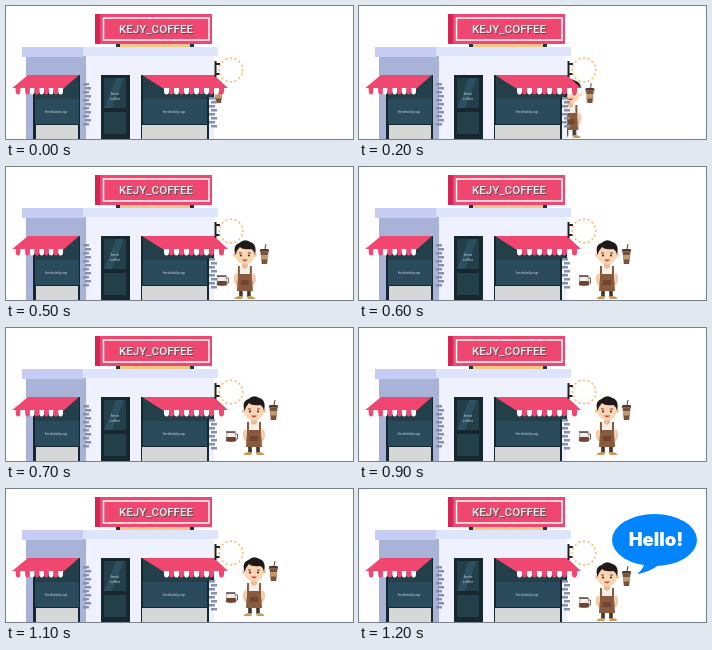
Animation, 347 px wide and 133 px high, one loop 6.2 s. Source, as an HTML page:

```html
<!DOCTYPE html>
<html lang="en">
<head>
<meta charset="utf-8">
<title>Coffee shop greeting</title>
<style>
  html, body { margin: 0; width: 100%; height: 100%; overflow: hidden; background: #fff; }
  svg { display: block; width: 347px; height: 133px; }
  text { text-anchor: middle; }
  .small { font: 3.6px "Open Sans", sans-serif; fill: #dce5ea; }
  .sign { font: 500 11.6px Roboto, sans-serif; }
  .hello { font: 900 18.5px Inter, sans-serif; fill: #fff; }
  .walk { animation: walk 6.2s steps(6, end) infinite; }
  .hop { animation: hop 6.2s step-end infinite; }
  .bubble { animation: speak 6.2s step-end infinite; }
  @keyframes walk {
    0% { transform: translateX(-55px); }
    9.677%, 100% { transform: none; }
  }
  @keyframes hop {
    0%, 12.903%, 16.129%, 19.354% { transform: none; }
    11.29%, 14.516%, 17.741% { transform: translateY(-5px); }
  }
  @keyframes speak {
    0% { visibility: hidden; }
    19.354%, 100% { visibility: visible; }
  }
</style>
</head>
<body>
<svg viewBox="0 0 347 133">
  <g class="walk"><g class="hop">
    <!-- barista -->
    <path d="M244 122v8M252 122v8" stroke="#40342f" stroke-width="3.6"/>
    <path d="M237.5 132q1-3.500 8-3v3zM250.500 132v-3q7-.500 8 3z" fill="#c99a5b"/>
    <path d="M241 101q7-3 14 0l3 11-2 5h-16l-2-5z" fill="#f3efeb"/>
    <path d="M239 108q-2 5 1 9M257 108q2 5-1 9" fill="none" stroke="#f5c6a0" stroke-width="2.600" stroke-linecap="round"/>
    <path d="M243 99v8h10v-8h2v8l1 17h-16l1-17v-8z" fill="#8a5a3c"/>
    <path d="M244 113h8v5h-8z" fill="#704630"/>
    <path d="M245 96h6v4l-3 2-3-2z" fill="#efb98f"/>
    <circle cx="238" cy="88" r="2" fill="#f5c6a0"/>
    <circle cx="258" cy="88" r="2" fill="#f5c6a0"/>
    <ellipse cx="248" cy="88" rx="9.500" ry="9.600" fill="#fdd5b2"/>
    <path d="M238.500 88q-3-10 4-12 5-5 11-1 7 2 4.500 13-1-5-4-6-8 1-11-2-3 3-4.500 8z" fill="#20191a"/>
    <path d="M242 86h3M251 86h3" stroke="#33231f" stroke-width=".8"/>
    <circle cx="244" cy="88.500" r="1" fill="#20191a"/>
    <circle cx="252" cy="88.500" r="1" fill="#20191a"/>
    <path d="M245 92.500q3 4 6 0z" fill="#c94b45"/>
    <!-- cup and jug -->
    <path d="M268 82l1-5" stroke="#56402f"/>
    <path d="M263.500 82h8l.8 2.800h-9.600z" fill="#51372b"/>
    <path d="M263.500 85h8l-1.400 12h-5.200z" fill="#795139"/>
    <path d="M263.900 88h7.200l-.5 4.500h-6.200z" fill="#c39a70"/>
    <path d="M229 111h2.500v5H229" fill="none" stroke="#6b5a50"/>
    <path d="M221 109.500h8l1 8.500q-5 1.500-10 0z" fill="#f3eee9" stroke="#8b7c73" stroke-width=".6"/>
    <path d="M220.500 114h9l.5 4q-5 1.500-10 0z" fill="#6b4430"/>
    <path d="M220 109h9.500" stroke="#4d3930" stroke-width="1.400"/>
  </g></g>

  <!-- walls and roof -->
  <path d="M20 50h60v83H20z" fill="#a9b3d8"/>
  <path d="M80 50h128v83H80z" fill="#eff1fe"/>
  <path d="M16 41h61v10H16z" fill="#c5cdf4"/>
  <path d="M77 41h135v9H77z" fill="#dfe4fd"/>
  <g id="bricks" fill="#8790ad"></g>

  <!-- sign -->
  <path d="M110 38h78v3h-78z" fill="#efc88a"/>
  <path d="M110 38h4v3h-4zM184 38h4v3h-4z" fill="#26323a"/>
  <path d="M89 8h5v30h-5z" fill="#d42656"/>
  <path d="M94 8h112v30H94z" fill="#ef476f"/>
  <path d="M97.500 12h105.500v22H97.500z" fill="none" stroke="#fff" stroke-width="1.500"/>
  <text class="sign" x="151" y="28" fill="#5d4a50">KEJY_COFFEE</text>
  <text class="sign" x="150" y="27" fill="#f7f1f2">KEJY_COFFEE</text>

  <!-- windows and door -->
  <path d="M27 69h47v64H27zM135 69h73v22h-5v42h-68zM95 69h29v64H95z" fill="#17272f"/>
  <path d="M29 69h44v24H29zM137 69h69v22h-5v2h-64z" fill="#223f4a"/>
  <path d="M29 93h44v25H29zM137 93h64v25h-64z" fill="#294b5b"/>
  <path d="M98 72h22v30H98zM98 106h22v22H98z" fill="#223f4a"/>
  <path d="M98 102l12-30h8l-12 30z" fill="#2d5060"/>
  <path d="M30 119h42v14H30zM136 119h65v14h-65z" fill="#d6d8d8"/>
  <text class="small" x="50" y="107">freshdailycup</text>
  <text class="small" x="168" y="107">freshdailycup</text>
  <text class="small" x="109" y="89">fresh</text>
  <text class="small" x="109" y="94">coffee</text>

  <!-- awnings -->
  <path d="M22 69h51L57 83H5z" fill="#ef476f"/>
  <path d="M136 69h72l15 14h-65z" fill="#ef476f"/>
  <g id="scallops"></g>

  <!-- hanging lights -->
  <path d="M209.500 55v16M209 58h5M209 68h5" stroke="#222" stroke-width="2"/>
  <circle cx="225" cy="64" r="11.800" fill="none" stroke="#fff0d2" stroke-width=".7"/>
  <circle cx="225" cy="64" r="11.800" fill="none" stroke="#f2bd70" stroke-width="2" stroke-linecap="round" pathLength="16" stroke-dasharray="0 1"/>

  <g class="bubble">
    <path d="M286 72q-1 8-8 13 13-2 23-10z" fill="#0084ff"/>
    <ellipse cx="295.500" cy="51" rx="42.500" ry="26" fill="#0084ff"/>
    <text class="hello" x="297" y="57">Hello!</text>
  </g>
</svg>
<script>
  const addPath = (id, d, fill) => {
    const path = document.createElementNS("http://www.w3.org/2000/svg", "path");
    path.setAttribute("d", d);
    if (fill) path.setAttribute("fill", fill);
    document.getElementById(id).append(path);
  };

  function scallops(left, right, count, y) {
    const width = (right - left) / count;
    for (let i = 0; i < count; i++) {
      const x = left + i * width;
      addPath("scallops",
        `M${x} ${y}h${width}v3a${width / 2} 3.500 0 0 1 ${-width} 0z`,
        i % 2 ? "#ef476f" : "#fff");
    }
  }

  function bricks(x, top, rows) {
    for (let i = 0; i < rows; i++) {
      addPath("bricks", `M${x + i % 2 * 2} ${top + i * 4}h6v2.500h-6z`);
    }
  }

  scallops(5, 57, 11, 82);
  scallops(158, 223, 13, 82);
  bricks(77, 77, 11);
  bricks(203, 91, 8);
</script>
</body>
</html>
```
